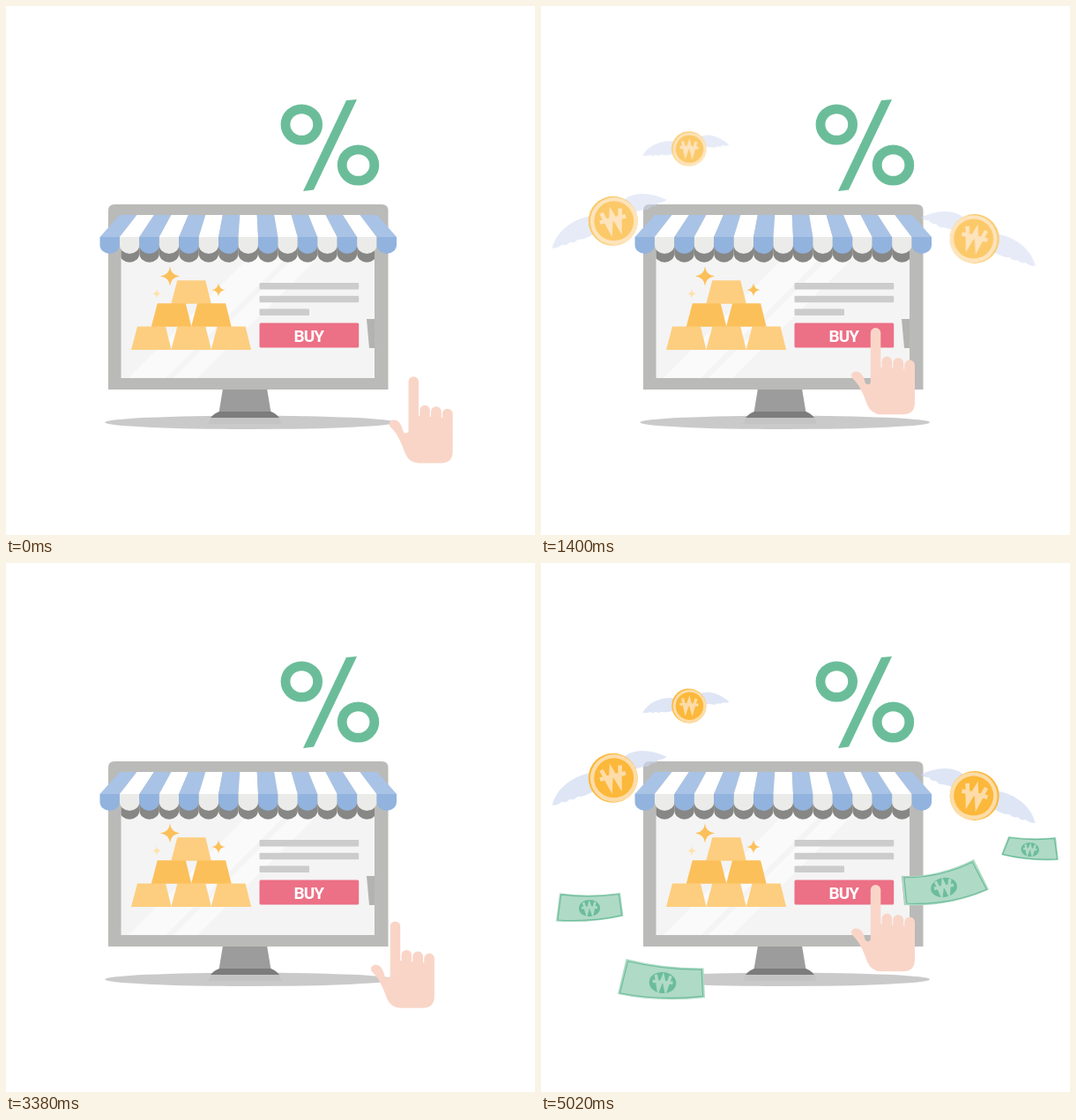
Animation, 600 px wide and 600 px high, one loop 6 s. Source, as an HTML page:

```html
<!DOCTYPE html>
<html lang="en">
<head>
<meta charset="utf-8">
<title>Online gold shop</title>
<style>
  html, body { margin: 0; width: 100%; height: 100%; overflow: hidden; background: #fff; }
  svg { display: block; width: 100vw; height: 100vh; }
  text { font: 700 19px Roboto, "Open Sans", sans-serif; letter-spacing: -.9px; }
</style>
</head>
<body>
<svg viewBox="0 0 600 600">
  <defs>
    <path id="won" d="M-11-11L-5.5 10 0-8 5.5 10 11-11M-15-1H15" fill="none" stroke-width="4.6"/>
    <path id="bar" d="M7 0H39L45.500 26.500H0Z"/>
    <path id="star" d="M0-11Q1.200-1.200 11 0Q1.200 1.200 0 11Q-1.200 1.200-11 0Q-1.200-1.200 0-11Z"/>
    <g id="coin">
      <g fill="#cdd8f0" opacity=".65">
        <path d="M-20-6C-42-5-64 10-69 31Q-62 31-58 27Q-53 29-49 24Q-44 26-40 21Q-33 22-22 15Z"/>
        <path d="M10-22C22-34 42-33 61-24Q57-20 52-21Q49-16 44-17Q40-12 36-13L24-10Z"/>
      </g>
      <circle r="28" fill="#fbb83a"/>
      <circle cx="1.200" cy=".3" r="27" fill="#fddca8"/>
      <circle cx="1" r="22.500" fill="#fbb83a"/>
      <use href="#won" transform="translate(0 -1) rotate(-14)" stroke="#fddca8"/>
    </g>
    <clipPath id="screen"><path d="M130.500 262H418V422H130.500Z"/></clipPath>
  </defs>

  <g fill="none" stroke="#6bbd9a" stroke-width="10.800">
    <ellipse cx="335.300" cy="134.500" rx="18.300" ry="17.700"/>
    <ellipse cx="399.500" cy="180.500" rx="18.300" ry="17.700"/>
  </g>
  <path d="M386 107L398 106 349 208.500 337 210Z" fill="#6bbd9a"/>

  <ellipse cx="276.700" cy="472.300" rx="164.500" ry="7.700" fill="#cacaca"/>
  <path d="M232 467H310L313 474H229Z" fill="#c4c4c4"/>
  <path d="M246 434H296L300.500 461H241.500Z" fill="#9c9c9c"/>
  <path d="M242 460H300.500Q306 462 310 467H232Q236 462 242 460Z" fill="#7c7c7c"/>
  <path d="M116 435V232Q116 225 123 225H426Q433.500 225 433.500 232V435Z" fill="#babab8"/>
  <g clip-path="url(#screen)">
    <path d="M130 262H418V422H130Z" fill="#f4f4f4"/>
    <path d="M139 422H181L341 262H299ZM190 422H217L377 262H350Z" fill="#fafafa"/>
    <path d="M409 355H418V388H412Z" fill="#b3b3b1"/>
    <g id="shade" fill="#878785"/>
  </g>
  <g id="awning"/>

  <g fill="#fdce7f">
    <use href="#bar" x="187.300" y="311.200"/>
    <use href="#bar" x="142" y="363.500"/>
    <use href="#bar" x="187.300" y="363.500"/>
    <use href="#bar" x="232.600" y="363.500"/>
  </g>
  <g fill="#fcc05a">
    <use href="#bar" x="164.800" y="337.300"/>
    <use href="#bar" x="210.100" y="337.300"/>
    <use href="#star" transform="translate(186 306.500)"/>
    <use href="#star" transform="translate(241 322) scale(.7)"/>
  </g>
  <use href="#star" transform="translate(171 326.500) scale(.47)" fill="#fde3ae"/>

  <g fill="#ccc">
    <rect x="287.500" y="314" width="112.700" height="7.500" rx="1"/>
    <rect x="287.500" y="328.700" width="112.700" height="7.500" rx="1"/>
    <rect x="287.500" y="343.500" width="56.500" height="7.500" rx="1"/>
  </g>
  <rect x="287.500" y="359.500" width="112.700" height="28" rx="1.500" fill="#ec7086"/>
  <text x="343.300" y="380.700" text-anchor="middle" fill="#fff">BUY</text>

  <g id="bills" opacity="0"/>
  <g id="coins" opacity="0">
    <use href="#coin" transform="translate(81.700 243.800)"/>
    <use href="#coin" transform="translate(491.700 264) scale(-1 1)"/>
    <use href="#coin" transform="translate(167.800 162) rotate(16) scale(.7)"/>
  </g>
  <path id="hand" fill="#f9d5c8" d="M456.500 482V426A5.700 5.700 0 0 1 468 426V465H469.300V458.500A5.700 5.700 0 0 1 480.800 458.500V466H482V460.200A5.800 5.800 0 0 1 493.800 460.200V467H495V462.500A5.800 5.800 0 0 1 506.700 462.500V505Q506.700 518.500 493 518.500H469Q457 518.500 452.500 507C448 494 444 485 435.500 477C432 471 441 466 446.500 473C451 479 449 484 453 484.500Q456 484.500 456.500 482Z"/>
</svg>
<script>
const $ = id => document.getElementById(id);

// Awning: 15 stripes narrowing upwards, scalloped hem and its shadow
const STRIPES = 15, left = 106.5, width = 336.5 / STRIPES, topLeft = 129, topWidth = 292 / STRIPES;
const scallop = (x, y, depth) =>
  `M${x} ${y}h${width}v${depth - 10}a${width / 2} 10 0 0 1 ${-width} 0Z`;
let stripes = '', shade = '';
for (let i = 0; i < STRIPES; i++) {
  const x = left + i * width, top = topLeft + i * topWidth, blue = i % 2 === 0;
  stripes += `<path d="M${top} 237h${topWidth}L${x + width} 262H${x}Z" fill="${blue ? '#a9c3e6' : '#fff'}"/>
    <path d="${scallop(x, 262, 19)}" fill="${blue ? '#91b3de' : '#ebebe9'}"/>`;
  shade += `<path d="${scallop(x, 262, 28.7)}"/>`;
}
$('awning').innerHTML = stripes;
$('shade').innerHTML = shade;

// Banknote: curved outline, inset line and an oval seal
function bill(outline, x, y, rx, ry, tilt) {
  const inset = `translate(${x} ${y}) scale(.95 .9) translate(${-x} ${-y})`;
  return `<path d="${outline}" fill="#afdac6"/>
    <path d="${outline}" transform="${inset}" fill="none" stroke="#6bbd9a" stroke-width="1.3"/>
    <g transform="translate(${x} ${y}) rotate(${tilt})">
      <ellipse rx="${rx}" ry="${ry}" fill="#6bbd9a"/>
      <use href="#won" transform="scale(${rx / 20})" stroke="#afdac6"/>
    </g>`;
}
$('bills').innerHTML =
  bill('M96.500 449Q140 460 184.500 459.500L186 493Q135 499 87 489Z', 138, 476, 15.3, 12, 5) +
  bill('M409.500 355.500Q452 356 491 336L508 370.500Q462 391 412.500 388Z', 457, 368, 15, 11, -10) +
  bill('M21 374.500Q55 379 90 374L93.500 400.500Q58 409 17 406.500Z', 55, 391.500, 12, 9.5, -2) +
  bill('M530 310Q557 314 584 311L587 337Q553 339 522 331Z', 554.700, 325, 10.3, 8, 4);

const LOOP = 6000, ROUND = 2980;
const ease = (t, start, end) => {
  const p = Math.min(1, Math.max(0, (t - start) / (end - start)));
  return (1 - Math.cos(Math.PI * p)) / 2;
};

function draw(now) {
  let t = now % LOOP;
  if (t >= ROUND) t -= ROUND;
  const reach = ease(t, 0, 1200);
  $('hand').setAttribute('transform', `translate(${-82.7 * reach} ${-55.2 * reach})`);
  $('coins').setAttribute('opacity', ease(t, 900, 1640));
  $('bills').setAttribute('opacity', ease(t, 1420, 2060));
}
function tick() {
  draw(performance.now());
  requestAnimationFrame(tick);
}
tick();
</script>
</body>
</html>
```
